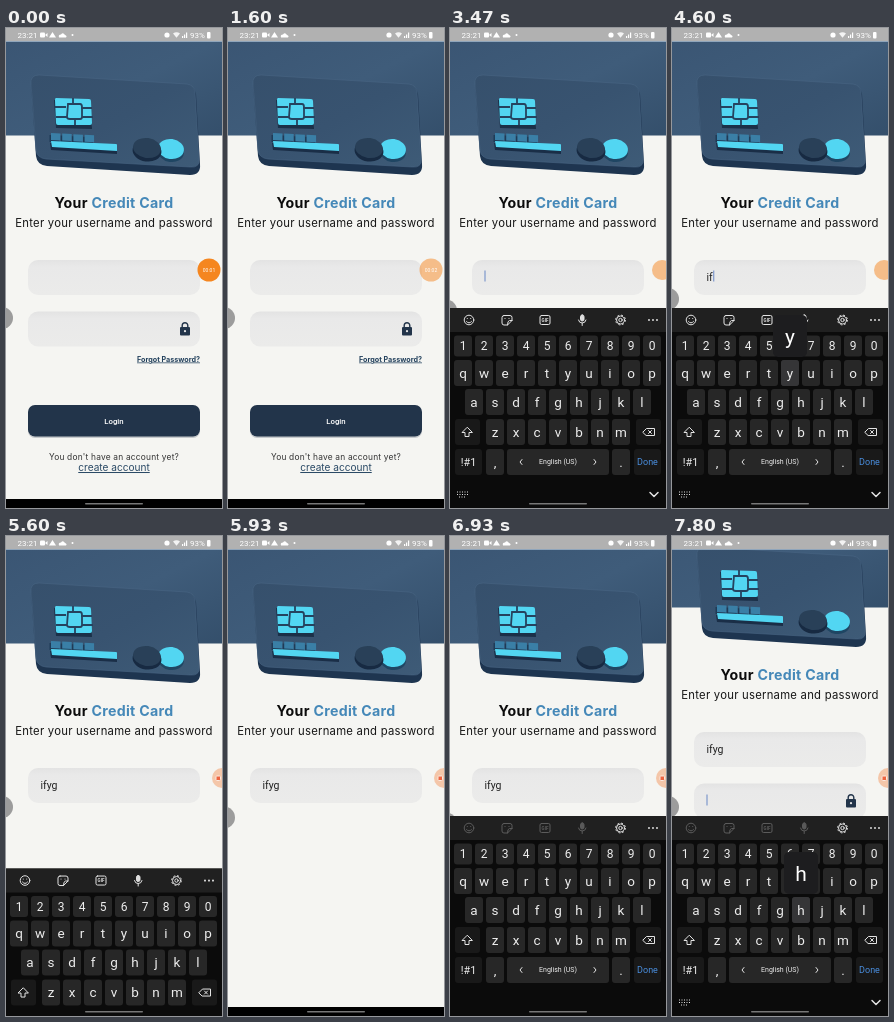
Write an HTML page that moves like this. It is 216 px wide and 480 px high and loops after 8 s.

```html
<!DOCTYPE html>
<html lang="en">
<head>
<meta charset="utf-8">
<title>Card login</title>
<style>
html, body { margin: 0; height: 100%; overflow: hidden; background: #000; }
svg { display: block; width: 216px; height: 480px; font-family: Inter, sans-serif; }
.mid { text-anchor: middle; }
.roboto { font-family: Roboto, sans-serif; }
.line { fill: none; stroke: #e4e4e4; stroke-width: 1; stroke-linecap: round; stroke-linejoin: round; }
.cyan { fill: #52d6f2; }
</style>
</head>
<body>
<svg viewBox="0 0 216 480">
  <defs>
    <linearGradient id="sky" x2="1" y2="1">
      <stop stop-color="#3a5573"/><stop offset=".55" stop-color="#3f5c7a"/><stop offset="1" stop-color="#344f6b"/>
    </linearGradient>
    <linearGradient id="face" x2="1" y2="1">
      <stop stop-color="#36506c"/><stop offset=".5" stop-color="#385370"/><stop offset="1" stop-color="#3e5b77"/>
    </linearGradient>
    <linearGradient id="well" x2="0" y2="1">
      <stop stop-color="#e3e3e3"/><stop offset=".2" stop-color="#e9e9e9"/><stop offset="1" stop-color="#ebebea"/>
    </linearGradient>
  </defs>
  <rect width="216" height="472" fill="#f5f5f2"/>

  <g id="page">
    <rect width="216" height="107.500" fill="url(#sky)"/>
    <path d="M25 57Q24 48 33 48L181 57Q189 58 190 66L194 136Q195 147 184 147L41 138Q31 137 30 128Z" fill="#1e3550"/>
    <path d="M25 56Q24 47 33 47L181 56Q188 57 189 64L193 131Q194 140 184 139L40 131Q31 130 30 122Z" fill="url(#face)" stroke="#486683" stroke-width=".6"/>
    <g id="chip">
      <path d="M48 72L84 74L86 101L50 100Z" fill="#1b3048"/>
      <path class="cyan" d="M50 70L83 71Q85 71 85 73L86 95Q86 97 84 97L52 97Q50 97 50 95L49 72Q49 70 50 70Z"/>
      <path d="M49 79L60 79M50 89L61 89M75 80L86 80M76 89L87 89M67 70V76M69 91V97M62 76H74Q76 76 76 79V89Q76 91 74 91H64Q61 91 61 89Z" fill="none" stroke="#25435f" stroke-width="1.800"/>
    </g>
    <g id="digits"></g>
    <path d="M44 115L111 119V126L45 122Z" fill="#1a2e47"/>
    <path class="cyan" d="M45 113L110 116Q111 116 111 117V123L46 119Z"/>
    <ellipse cx="165" cy="124" rx="13" ry="10" fill="#1f4663" transform="rotate(8 165 124)"/>
    <ellipse class="cyan" cx="165" cy="121" rx="13" ry="10" transform="rotate(8 165 121)"/>
    <ellipse cx="141" cy="123" rx="14.5" ry="10.5" fill="#172a42" transform="rotate(8 141 123)"/>
    <ellipse cx="141" cy="120" rx="14" ry="10" fill="#294058" transform="rotate(8 141 120)"/>

    <g class="mid">
      <text x="108" y="180" font-size="14.200" letter-spacing=".3" font-weight="700" fill="#0c0c0c">Your <tspan fill="#4588b8">Credit Card</tspan></text>
      <text x="108" y="199" font-size="11.300" letter-spacing=".24" fill="#161616">Enter your username and password</text>
    </g>
    <rect x="22" y="232" width="172" height="35" rx="10" fill="url(#well)"/>
    <text id="typed" class="roboto" x="34.500" y="252.500" font-size="10.500" fill="#222"></text>
    <g id="lower">
      <rect x="22" y="283.500" width="172" height="35" rx="10" fill="url(#well)"/>
      <rect x="174" y="299" width="10" height="8.500" rx="1" fill="#22344a"/>
      <path d="M176.200 300V297.500A2.800 2.800 0 0 1 181.800 297.500V300" fill="none" stroke="#22344a" stroke-width="1.400"/>
      <circle cx="179" cy="303.200" r="1.100" fill="#e9e9e9"/>
      <text x="194" y="333.500" font-size="7.200" font-weight="700" fill="#22405c" text-anchor="end" text-decoration="underline">Forgot Password?</text>
      <rect x="22" y="378" width="172" height="32" rx="7" fill="#c6c9cc"/>
      <rect x="22" y="377" width="172" height="31.500" rx="7" fill="#22344a"/>
      <g class="mid">
        <text class="roboto" x="108" y="395.500" font-size="7.800" font-weight="500" fill="#fff">Login</text>
        <text x="108" y="432" font-size="8.400" letter-spacing=".2" fill="#333">You don't have an account yet?</text>
        <text x="108" y="443" font-size="10.100" fill="#2b4a66" text-decoration="underline">create account</text>
      </g>
    </g>
    <rect id="caret" width="1.200" height="11" fill="#7f98cc"/>
  </g>

  <circle id="handle" cx="-4" r="11" fill="#9c9c9c"/>

  <g id="keyboard">
    <rect y="280" width="216" height="200" fill="#0b0b0b"/>
    <rect y="280" width="216" height="24" fill="#202020"/>
    <g id="tools" class="line">
      <circle cx="19" cy="292" r="4.800"/><path d="M16.500 293.500Q19 296.500 21.500 293.500M17.300 290.500V290.600M20.700 290.500V290.600"/>
      <path d="M54 287.500H60Q62 287.500 62 289.500V292.500L57.500 297H54Q52 297 52 295V289.500Q52 287.500 54 287.500ZM62 292.500H59.500Q57.500 292.500 57.500 297M55 290.500V290.600M59 290.500V290.600"/>
      <rect x="90" y="287.500" width="10" height="9" rx="1.500"/>
      <text class="mid roboto" x="95" y="293.700" font-size="4.500" font-weight="700" fill="#ddd" stroke="none">GIF</text>
      <rect x="130.500" y="287" width="3.500" height="6" rx="1.700" fill="#ddd"/><path d="M128.500 292Q129 295 132.200 295T136 292M132.200 295V297.500"/>
    </g>
    <g class="line">
      <circle cx="170.500" cy="292" r="1.700"/>
      <circle cx="170.500" cy="292" r="4"/>
      <circle cx="170.500" cy="292" r="4.900" stroke-dasharray="1.900 1.950" stroke-linecap="butt"/>
      <path d="M199 292V292.100M203 292V292.100M207 292V292.100" stroke-width="1.900"/>
    </g>
    <g id="keys" class="mid roboto" fill="#eee"></g>
    <g class="line">
      <path d="M17 399.500L12 404.500H15V408.500H19V404.500H22Z"/>
      <path d="M193 404L196.500 400.500H204.500V407.500H196.500ZM198.500 402.500L201.500 405.500M201.500 402.500L198.500 405.500"/>
      <path d="M72 431.500L70 434L72 436.500M144 431.500L146 434L144 436.500"/>
    </g>
    <g id="dock" class="line">
      <path d="M200 464.500L204 468.500L208 464.500" stroke-width="1.500"/>
      <path d="M7 464H18M7 466.500H18M9 469H16" stroke-dasharray="1 1.500" stroke-linecap="butt"/>
    </g>
    <g id="popup" class="mid roboto">
      <rect id="pressed" width="18" height="26" rx="3" fill="#353537"/>
      <text id="pressedLetter" font-size="13.500" fill="#eee"></text>
      <rect id="bubble" width="34" height="42" rx="5" fill="#1d1d1f"/>
      <text id="bubbleLetter" font-size="21" fill="#fff"></text>
    </g>
  </g>

  <g id="recorder">
    <circle id="disc" cy="242"/>
    <text id="clock" class="mid roboto" y="244" font-size="5" fill="#fff"></text>
    <rect id="stop" x="210" y="240" width="4.500" height="4.500" rx=".8" fill="#ee6440" stroke="#fbe9df"/>
  </g>

  <rect width="216" height="13" fill="#b1b1b1"/>
  <rect y="13" width="216" height="1" fill="#8fa5bb"/>
  <g class="roboto" fill="#fff" font-size="8">
    <text x="11.500" y="9.700">23:21</text>
    <text x="184" y="9.700">93%</text>
    <rect x="34" y="4.500" width="5" height="5" rx="1"/><path d="M39 7L41.500 5V9Z"/>
    <path d="M43 9.500L46.500 4L50 9.500ZM53 9.500Q52 6.500 55 6.500Q57 4 59 7Q61.500 8 60 9.500Z"/>
    <circle cx="66.500" cy="7" r="1"/>
    <circle cx="161" cy="7" r="2.600"/>
    <path d="M167 5.500Q170.500 3 174 5.500L170.500 9.800Z" opacity=".85"/>
    <path d="M176 10V8H177.200V10ZM178 10V6.500H179.200V10ZM180 10V4.500H181.200V10Z"/>
    <rect x="201" y="4" width="3.500" height="6.500" rx="1"/>
  </g>
  <rect id="navigation" y="471" width="216" height="9"/>
  <rect x="79" y="475" width="58" height="1.500" rx=".75" fill="#777"/>
</svg>

<script>
const LOOP = 8000, NAME = 'ifyg';
const $ = id => document.getElementById(id);
const set = (id, attrs) => { for (const k in attrs) $(id).setAttribute(k, attrs[k]); };
const show = (id, on) => set(id, { display: on ? 'inline' : 'none' });
const ramp = (t, a, b) => Math.min(1, Math.max(0, (t - a) / (b - a)));
const ease = (t, a, b) => { const p = ramp(t, a, b); return p * p * (3 - 2 * p); };
const within = (t, a, b) => t >= a && t < b;

// Raised number blocks on the card
$('digits').innerHTML = [0, 1, 2, 3].map(i => {
  const x = 45 + i * 11.2, y = 105 + i * .6;
  return `<path d="M${x - 1.5} ${y + 2}l10 .5v7l-10 -.5z" fill="#1f3b56"/><path d="M${x} ${y}l9.500 .5v7l-9.500 -.5z" fill="#3a7fa6"/>`;
}).join('');

// Keyboard
const keyAt = {};
let keysMarkup = '';
function key(label, x, y, { w = 18, h = 26, size = 13.5, fill = '#272727', color = '#eee' } = {}) {
  keyAt[label] = { x, y };
  keysMarkup += `<rect x="${x - w / 2}" y="${y - h / 2}" width="${w}" height="${h}" rx="3" fill="${fill}"/>
    <text x="${x}" y="${y + size * .34}" font-size="${size}" fill="${color}">${label}</text>`;
}
[['1234567890', 13, 318, { h: 21, size: 12 }], ['qwertyuiop', 13, 345], ['asdfghjkl', 24, 374], ['zxcvbnm', 45, 404]]
  .forEach(([row, x, y, style]) => [...row].forEach((c, i) => key(c, x + 21 * i, y, style)));
const dark = '#191919';
key('', 17.5, 404, { w: 25, fill: dark });
key('', 198.5, 404, { w: 25, fill: dark });
key('!#1', 18.5, 434, { w: 27, size: 10.8, fill: dark });
key(',', 45, 434);
key('English (US)', 108, 434, { w: 102, size: 7 });
key('.', 171, 434);
key('Done', 197.5, 434, { w: 27, size: 9, fill: dark, color: '#4a8fe0' });
$('keys').innerHTML = keysMarkup;

// Letter, press time, release time
const taps = [...NAME].map((c, i) => [c, [4070, 4330, 4530, 4870][i], [4250, 4460, 4670, 5030][i]]);
const passwordTap = ['h', 7800, LOOP];

function drawPopup(t) {
  const tap = [...taps, passwordTap].find(([, down, up]) => within(t, down, up));
  show('popup', tap);
  if (!tap) return;
  const { x, y } = keyAt[tap[0]];
  set('pressed', { x: x - 9, y: y - 13 });
  set('pressedLetter', { x, y: y + 4.6 });
  set('bubble', { x: x - 17, y: y - 58 });
  set('bubbleLetter', { x, y: y - 29.5 });
  $('pressedLetter').textContent = $('bubbleLetter').textContent = tap[0];
}

function drawCaret(t) {
  const inPassword = t > 6000;
  const on = within(t, 3370, 3870) || within(t, 4260, 5480) ||
    within(t, 6100, 6600) || within(t, 6930, 7170) || t >= 7665;
  const textEnd = $('typed').textContent ? $('typed').getComputedTextLength() + .5 : 0;
  set('caret', inPassword ? { x: 34.4, y: 294.5 } : { x: 34.4 + textEnd, y: 242.5 });
  show('caret', on);
}

function drawRecorder(t) {
  const docked = t >= 5470;
  const slide = ease(t, 1600, 2130);
  const x = docked ? 216 : 203 + 9 * slide;
  set('disc', { cx: x, r: 11.5 - 1.5 * slide, fill: docked ? '#f3c3a4' : '#f5861f',
    opacity: docked ? .95 : 1 - .5 * ramp(t, 1040, 1140) });
  set('clock', { x });
  $('clock').textContent = '00:0' + (1 + Math.floor(t / 1070));
  show('clock', t < 2130);
  show('stop', docked);
}

function draw(t) {
  const second = t >= 6925;
  const open = second ? 1 : ease(t, 3210, 3460) - ease(t, 5470, 5860);
  set('keyboard', { transform: `translate(0 ${(1 - open) * 200})` });
  show('keyboard', open > 0);
  set('navigation', { fill: open > 0 ? '#0b0b0b' : '#000' });
  set('tools', { opacity: second ? .3 : 1 });
  show('dock', !second || t >= 7000);
  show('lower', !within(t, 5470, 6000));
  set('page', { transform: `translate(0 ${-36 * ease(t, 6960, 7400)})` });
  const lift = ease(t, 3300, 3700) - ease(t, 5700, 6130) + ease(t, 6850, 7200);
  set('handle', { cy: 290 - 19 * lift });
  $('typed').textContent = taps.filter(tap => t >= tap[2]).map(tap => tap[0]).join('');
  drawCaret(t);
  drawPopup(t);
  drawRecorder(t);
}

function tick() {
  draw(performance.now() % LOOP);
  requestAnimationFrame(tick);
}
tick();
</script>
</body>
</html>
```
